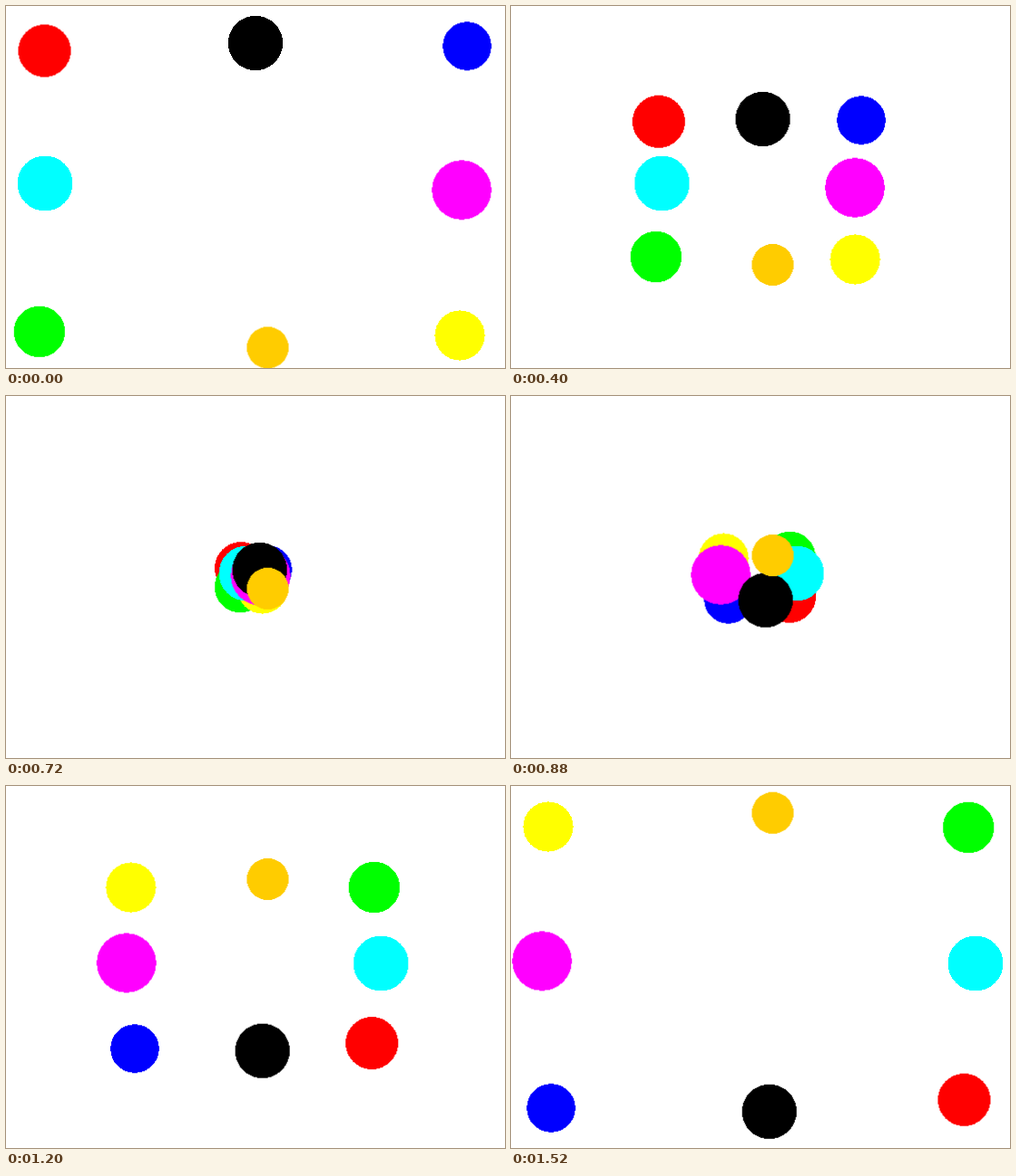
An HTML page without scripts for the animation above (1600 ms loop, 550 by 400 pixels).

```html
<!DOCTYPE html>
<html lang="en">
<head>
<meta charset="utf-8">
<title>Crossing circles</title>
<style>
  html, body { margin: 0; width: 100%; height: 100%; overflow: hidden; background: #fff; }
  svg { display: block; width: 550px; height: 400px; shape-rendering: crispEdges; }

  /* Each circle travels in a straight line, in 20 held poses of 80 ms. */
  circle { animation: cross 1600ms steps(20, jump-none) infinite; }
  @keyframes cross {
    from { transform: translate(var(--from)); }
    to   { transform: translate(var(--to)); }
  }
</style>
</head>
<body>
<svg viewBox="0 0 550 400">
  <circle r="29"   fill="#f00" style="--from: 42.5px, 49.5px; --to: 499.5px, 346.7px"/>
  <circle r="26.8" fill="#00f" style="--from: 508.2px, 44.3px; --to: 44.2px, 355.8px"/>
  <circle r="28.3" fill="#0f0" style="--from: 36.8px, 359.8px; --to: 504.2px, 45.8px"/>
  <circle r="27.6" fill="#ff0" style="--from: 500.2px, 364px; --to: 41px, 45px"/>
  <circle r="30.5" fill="#0ff" style="--from: 43px, 196px; --to: 512px, 196px"/>
  <circle r="32.8" fill="#f0f" style="--from: 502.3px, 203.3px; --to: 34.2px, 193.4px"/>
  <circle r="30.2" fill="#000" style="--from: 275px, 41px; --to: 284.7px, 359.8px"/>
  <circle r="23"   fill="#fc0" style="--from: 288.5px, 377.5px; --to: 288.5px, 29.7px"/>
</svg>
</body>
</html>
```
